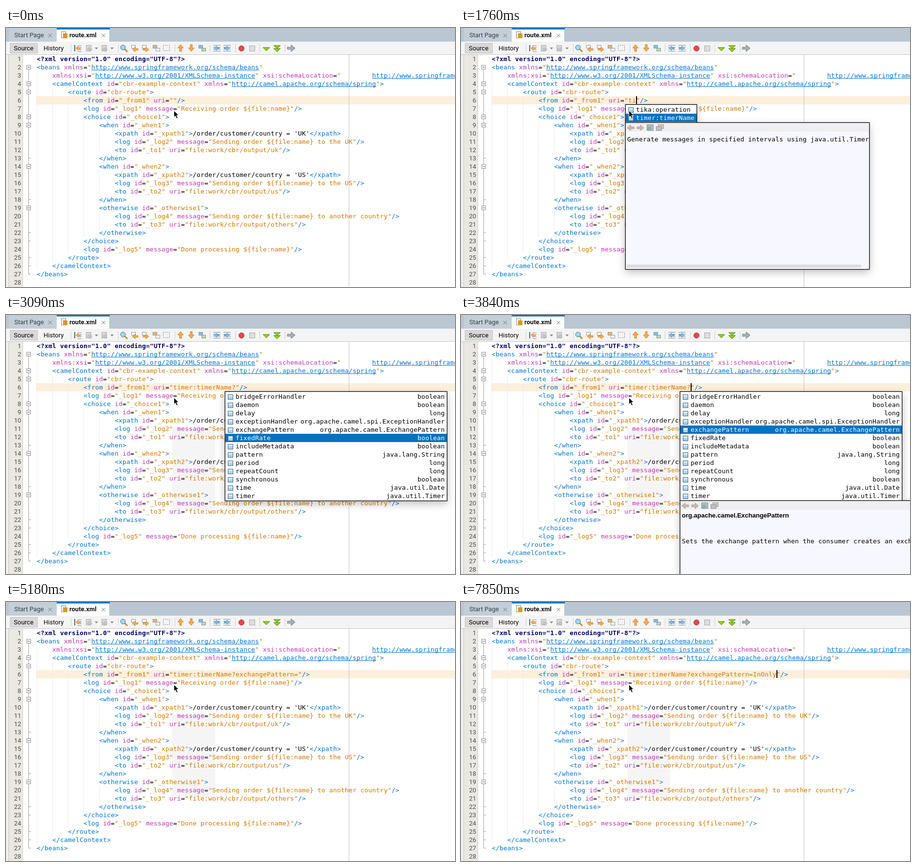
Animation of 921 by 532 pixels, one loop 8000 ms. Source, as an HTML page with a canvas:

```html
<!DOCTYPE html>
<html lang="en">
<head>
<meta charset="utf-8">
<title>Editor code completion</title>
<style>
html, body { margin: 0; width: 100%; height: 100%; overflow: hidden; background: #fff; }
canvas { display: block; }
</style>
</head>
<body>
<canvas id="stage" width="921" height="532"></canvas>
<script>
const ctx = document.getElementById('stage').getContext('2d');
const LOOP = 8000, LEFT = 63, CHAR = 8, ROW = 17;
const MONO = '13px "DejaVu Sans Mono", monospace';
const UI = '13px Roboto, sans-serif';
const BLUE = '#0073dc', PURPLE = '#c236b4', ORANGE = '#d37700', ACCENT = '#0073c4';

const source = `<?xml version="1.0" encoding="UTF-8"?>
<beans xmlns="http://www.springframework.org/schema/beans"
    xmlns:xsi="http://www.w3.org/2001/XMLSchema-instance" xsi:schemaLocation="        http://www.springframework.org/schema/beans
    <camelContext id="cbr-example-context" xmlns="http://camel.apache.org/schema/spring">
        <route id="cbr-route">
            <from id="_from1" uri="@"/>
            <log id="_log1" message="Receiving order \${file:name}"/>
            <choice id="_choice1">
                <when id="_when1">
                    <xpath id="_xpath1">/order/customer/country = 'UK'</xpath>
                    <log id="_log2" message="Sending order \${file:name} to the UK"/>
                    <to id="_to1" uri="file:work/cbr/output/uk"/>
                </when>
                <when id="_when2">
                    <xpath id="_xpath2">/order/customer/country = 'US'</xpath>
                    <log id="_log3" message="Sending order \${file:name} to the US"/>
                    <to id="_to2" uri="file:work/cbr/output/us"/>
                </when>
                <otherwise id="_otherwise1">
                    <log id="_log4" message="Sending order \${file:name} to another country"/>
                    <to id="_to3" uri="file:work/cbr/output/others"/>
                </otherwise>
            </choice>
            <log id="_log5" message="Done processing \${file:name}"/>
        </route>
    </camelContext>
</beans>
`.split('\n');

const schemes = [['tika:operation'], ['timer:timerName']];
const options = `bridgeErrorHandler boolean
daemon boolean
delay long
exceptionHandler org.apache.camel.spi.ExceptionHandler
exchangePattern org.apache.camel.ExchangePattern
fixedRate boolean
includeMetadata boolean
pattern java.lang.String
period long
repeatCount long
synchronous boolean
time java.util.Date
timer java.util.Timer`.split('\n').map(line => line.split(' '));
const patterns = [['InOnly'], ['InOut']];

const typed = [[0, ''], [150, 't'], [440, 'ti'], [1900, 'timer:timerName'], [2650, 'timer:timerName?'],
  [4880, 'timer:timerName?exchangePattern='], [6060, 'timer:timerName?exchangePattern=InOnly']];
const caretToggles = [150, 740, 1030, 1320, 1620, 2200, 2500, 2950, 3240, 3540, 3840, 4140, 4440,
  4730, 4880, 5180, 5470, 5770, 6060, 6360, 6660, 6960, 7260, 7550, 7850];

function rect(x, y, w, h, color) {
  ctx.fillStyle = color;
  ctx.fillRect(x, y, w, h);
}

function text(str, x, y, color, font = UI, align = 'left') {
  ctx.font = font;
  ctx.textAlign = align;
  ctx.fillStyle = color;
  ctx.fillText(str, x, y);
}

// Monospaced text on the editor's whole-pixel character grid.
function code(str, x, y, color = '#000', font = MONO) {
  [...str].forEach((char, i) => text(char, x + i * CHAR, y, color, font));
}

function poly(points, fill, stroke) {
  ctx.beginPath();
  for (let i = 0; i < points.length; i += 2) ctx.lineTo(points[i], points[i + 1]);
  ctx.closePath();
  if (fill) { ctx.fillStyle = fill; ctx.fill(); }
  if (stroke) { ctx.strokeStyle = stroke; ctx.lineWidth = 1; ctx.stroke(); }
}

function line(x1, y1, x2, y2, color, width = 1) {
  ctx.beginPath();
  ctx.moveTo(x1, y1);
  ctx.lineTo(x2, y2);
  ctx.strokeStyle = color;
  ctx.lineWidth = width;
  ctx.stroke();
}

function disc(x, y, r, fill, stroke) {
  ctx.beginPath();
  ctx.arc(x, y, r, 0, Math.PI * 2);
  ctx.fillStyle = fill;
  ctx.fill();
  ctx.lineWidth = 1;
  if (stroke) { ctx.strokeStyle = stroke; ctx.stroke(); }
}

function box(x, y, w, h, fill, stroke) {
  rect(x, y, w, h, stroke);
  rect(x + 1, y + 1, w - 2, h - 2, fill);
}

// Block arrow centred on (x, y), pointing right before rotation.
function arrow(x, y, angle, fill, stroke, s = 1) {
  ctx.save();
  ctx.translate(x, y);
  ctx.rotate(angle * Math.PI / 180);
  ctx.scale(s, s);
  poly([-7, -2, 0, -2, 0, -6, 7, 0, 0, 6, 0, 2, -7, 2], fill, stroke);
  ctx.restore();
}

function cross(x, y) {
  line(x - 3.5, y - 3.5, x + 3.5, y + 3.5, '#666');
  line(x + 3.5, y - 3.5, x - 3.5, y + 3.5, '#666');
}

function drawTabs() {
  rect(0, 0, 921, 28, '#bac7d2');
  rect(6, 0, 98, 28, '#c3ced8');
  rect(104, 0, 109, 28, '#fff');
  rect(104, 0, 109, 3, ACCENT);
  rect(212, 3, 1, 25, '#b0bcc7');
  text('Start Page', 17, 19, '#3a3f46');
  cross(90.5, 15.5);
  box(113, 7, 10, 14, '#f4f4f0', '#8a8f80');
  rect(117, 11, 9, 10, '#d99a22');
  text('route.xml', 130, 19, '#111', 'bold ' + UI);
  cross(200, 15.5);
}

function drawToolbar() {
  rect(0, 28, 921, 26, '#f4f4f4');
  rect(0, 54, 921, 1, '#c4c4c4');
  box(8, 31, 57, 21, '#d9d9d9', '#c2c2c2');
  text('Source', 16, 46, '#000');
  text('History', 77, 46, '#000');
  for (const x of [133, 230, 346, 418, 470, 520, 572]) rect(x, 33, 1, 17, '#cfcfcf');

  const page = (x, y, fill = '#fff') => box(x, y, 9, 7, fill, '#8596a6');
  const orange = ['#f8ab4c', '#cf8029'], grey = ['#c8c8c8', '#adadad'];
  const blue = ['#8cc4ea', '#3a80b5'], green = ['#8fd11f', '#55850c'];

  rect(140, 35, 2, 13, '#4d6b88');
  for (let y = 36; y < 49; y += 4) rect(147, y, 8, 1, '#8394a6');
  arrow(148, 41.5, 180, ...orange, .7);
  for (const x of [164, 196]) {
    box(x, 35, 11, 13, '#d6d6d6', '#b0b0b0');
    arrow(x + 7, 44, x === 164 ? 180 : 0, ...grey, .7);
    poly([x + 18, 40, x + 25, 40, x + 21.5, 44], '#8d8d8d');
  }
  line(243, 43, 249, 49, '#d88724', 3);
  disc(240, 40, 5, '#a9d5f3', '#35739f');
  page(257, 35);
  arrow(265, 44, 180, ...orange, .85);
  page(279, 35);
  arrow(287, 44, 0, ...orange, .85);
  page(301, 35, '#f4b45d');
  page(307, 41);
  ctx.setLineDash([2, 2]);
  ctx.strokeStyle = '#777';
  ctx.strokeRect(322.5, 35.5, 13, 11);
  ctx.setLineDash([]);
  arrow(358, 41, -90, ...orange);
  arrow(380, 41, 90, ...orange);
  page(395, 35, '#7fc0e8');
  page(401, 41, '#b9dca2');
  for (const x of [425, 446]) {
    for (let y = 35; y < 49; y += 4) rect(x, y, 15, 1, '#7d90a1');
    arrow(x + 7, 41.5, x === 425 ? 180 : 0, ...blue, .75);
  }
  disc(483, 42, 5.5, '#e5484d', '#bc2930');
  box(499, 36, 12, 12, '#dedede', '#aaa');
  poly([527, 40, 541, 40, 534, 47], ...green);
  poly([549, 36, 563, 36, 556, 42], ...green);
  poly([549, 42, 563, 42, 556, 49], ...green);
  arrow(585, 41.5, 0, '#a7b2bd', '#77838e', 1.1);
}

function drawGutter() {
  rect(0, 55, 6, 477, '#f0f0f0');
  rect(5, 28, 1, 504, '#c6c6c6');
  rect(6, 55, 28, 477, '#e9e8e2');
  rect(34, 55, 1, 477, '#d2d1cc');
  source.forEach((_, i) => text(i + 1, 31, 68 + ROW * i, '#4d4d4d', UI, 'right'));
  const rowMiddle = n => 63 + ROW * (n - 1);
  rect(46, rowMiddle(2), 1, 25 * ROW, '#a0a0a0');
  for (const n of [13, 18, 22, 23, 25, 26, 27]) rect(46, rowMiddle(n), 5, 1, '#a0a0a0');
  for (const n of [2, 4, 5, 8, 9, 14, 19]) {
    box(42, rowMiddle(n) - 4, 9, 9, '#fff', '#8c8c8c');
    rect(44, rowMiddle(n), 5, 1, '#555');
  }
}

function drawToken(token, x, y) {
  const url = token.match(/http[^"\s]*/);
  if (token.startsWith('<?')) return code(token, x, y, '#00006e', 'bold ' + MONO);
  if (url) {
    const start = x + url.index * CHAR, width = url[0].length * CHAR;
    code('"', x, y, ORANGE);
    code(url[0], start, y, BLUE);
    rect(start, y + 1, width, 1, BLUE);
    if (token.endsWith('"')) code('"', start + width, y, ORANGE);
    return;
  }
  const color = token[0] === '"' ? ORANGE
    : /^<|>$/.test(token) ? BLUE
    : /^[\w:]{2,}$/.test(token) ? PURPLE : '#000';
  code(token, x, y, color);
}

function drawCode(uri, caretOn) {
  rect(62, 140, 859, ROW, '#fcefdc');
  for (const [depth, first, last] of [[0, 3, 26], [1, 5, 25], [2, 6, 24], [3, 9, 22],
    [4, 10, 12], [4, 15, 17], [4, 20, 21]]) {
    rect(LEFT + depth * 32, 55 + ROW * (first - 1), 1, ROW * (last - first + 1), '#ebebeb');
  }
  rect(703, 55, 1, 477, '#c3c3c8');
  const pattern = /<\?.*\?>|<\/?\w+|\/?>|[\w:]+(?==)|"[^"]*"?|[^<"\s]/g;
  source.forEach((raw, i) => {
    for (const m of raw.replace('@', uri).matchAll(pattern)) {
      drawToken(m[0], LEFT + m.index * CHAR, 68 + ROW * i);
    }
  });
  if (caretOn) rect(343 + uri.length * CHAR, 140, 2, 16, '#000');
}

function castShadow(x, y, w, h) {
  ctx.save();
  ctx.shadowColor = 'rgba(0,0,0,.25)';
  ctx.shadowBlur = 16;
  ctx.shadowOffsetY = 6;
  rect(x, y, w, h, '#222');
  ctx.restore();
}

function panel(x, y, w, h, fill) {
  rect(x - .5, y - .5, w + 1, h + 1, '#222');
  rect(x + 1, y + 1, w - 2, h - 2, fill);
}

function drawList(items, selected, x, width, height, textX, icons) {
  panel(x, 157, width, height, '#fff');
  items.forEach(([name, type], i) => {
    const y = 159 + i * ROW, color = i === selected ? '#fff' : '#000';
    if (i === selected) rect(x + 1, y, width - 2, ROW, ACCENT);
    if (icons) {
      box(x + 6, y + 4, 11, 11, '#a9d3ec', '#45657e');
      rect(x + 7, y + 5, 9, 4, '#d3eaf7');
    }
    code(name, textX, y + 13, color);
    if (type) code(type, x + width - 5 - type.length * CHAR, y + 13, color);
  });
}

function drawDocs(x, y, title, body) {
  panel(x, y, 501, 302, '#f7f7ff');
  rect(x + 1, y + 1, 499, 18, '#efeff2');
  arrow(x + 11, y + 11, 180, '#c9b9ad', '#ab9c92');
  arrow(x + 31, y + 11, 0, '#c9b9ad', '#ab9c92');
  box(x + 44, y + 4, 14, 13, '#a9bccb', '#8b99a5');
  disc(x + 49, y + 13, 4.5, '#8fae9a');
  box(x + 67, y + 4, 12, 9, '#cfcac6', '#9b9a9a');
  box(x + 63, y + 8, 12, 9, '#bcc0c5', '#929292');
  ctx.save();
  ctx.beginPath();
  ctx.rect(x + 1, y + 19, 499, 281);
  ctx.clip();
  if (title) text(title, x + 4, y + 35, '#000', 'bold 13px "Liberation Sans", Arial, sans-serif');
  code(body, x + 4, y + (title ? 88 : 39));
  ctx.restore();
  rect(x + 3, y + 292, 481, 6, '#dcdce0');
}

function drawCompletion(items, selected, x, width, textX, { icons = true, title = '', body = '' }) {
  const height = items.length * ROW + 4, docsY = 157 + height - 1;
  castShadow(x, 157, width, height);
  if (body) castShadow(x, docsY, 501, 302);
  drawList(items, selected, x, width, height, textX, icons);
  if (body) drawDocs(x, docsY, title, body);
}

function drawPopups(t) {
  if (t >= 890 && t < 1900) {
    const selected = t < 1470 ? 0 : 1;
    const body = selected
      ? 'Generate messages in specified intervals using java.util.Timer and a scheduler.'
      : 'Parse documents and extract metadata and text using Apache Tika.';
    drawCompletion(schemes, selected, 337, 147, 359, { body: t >= 1180 ? body : '' });
  } else if (t >= 2950 && t < 4880) {
    const selected = t < 3840 ? 5 : 4;
    const body = selected === 5
      ? 'Events take place at approximately regular intervals, separated by the specified period.'
      : 'Sets the exchange pattern when the consumer creates an exchange.';
    drawCompletion(options, selected, 449, 456, 471,
      { title: options[selected][1], body: t >= 3240 ? body : '' });
  } else if (t >= 5330 && t < 6060) {
    drawCompletion(patterns, 0, 589, 62, 599, { icons: false });
  }
}

function drawPointer() {
  poly([344.5, 169.5, 344.5, 183.5, 347.5, 180.5, 350, 186, 352.5, 185, 350, 179.5, 354, 179.5],
    '#000', '#fff');
}

function render(now) {
  const t = now % LOOP;
  const uri = typed.findLast(([start]) => t >= start)[1];
  const caretOn = caretToggles.filter(time => t >= time).length % 2 === 1;
  rect(0, 0, 921, 532, '#fff');
  if (t >= 2950) rect(341, 232, 88, 170, '#f5f5f5');
  drawCode(uri, caretOn);
  drawGutter();
  drawTabs();
  drawToolbar();
  drawPopups(t);
  drawPointer();
  requestAnimationFrame(render);
}
requestAnimationFrame(render);
</script>
</body>
</html>
```
